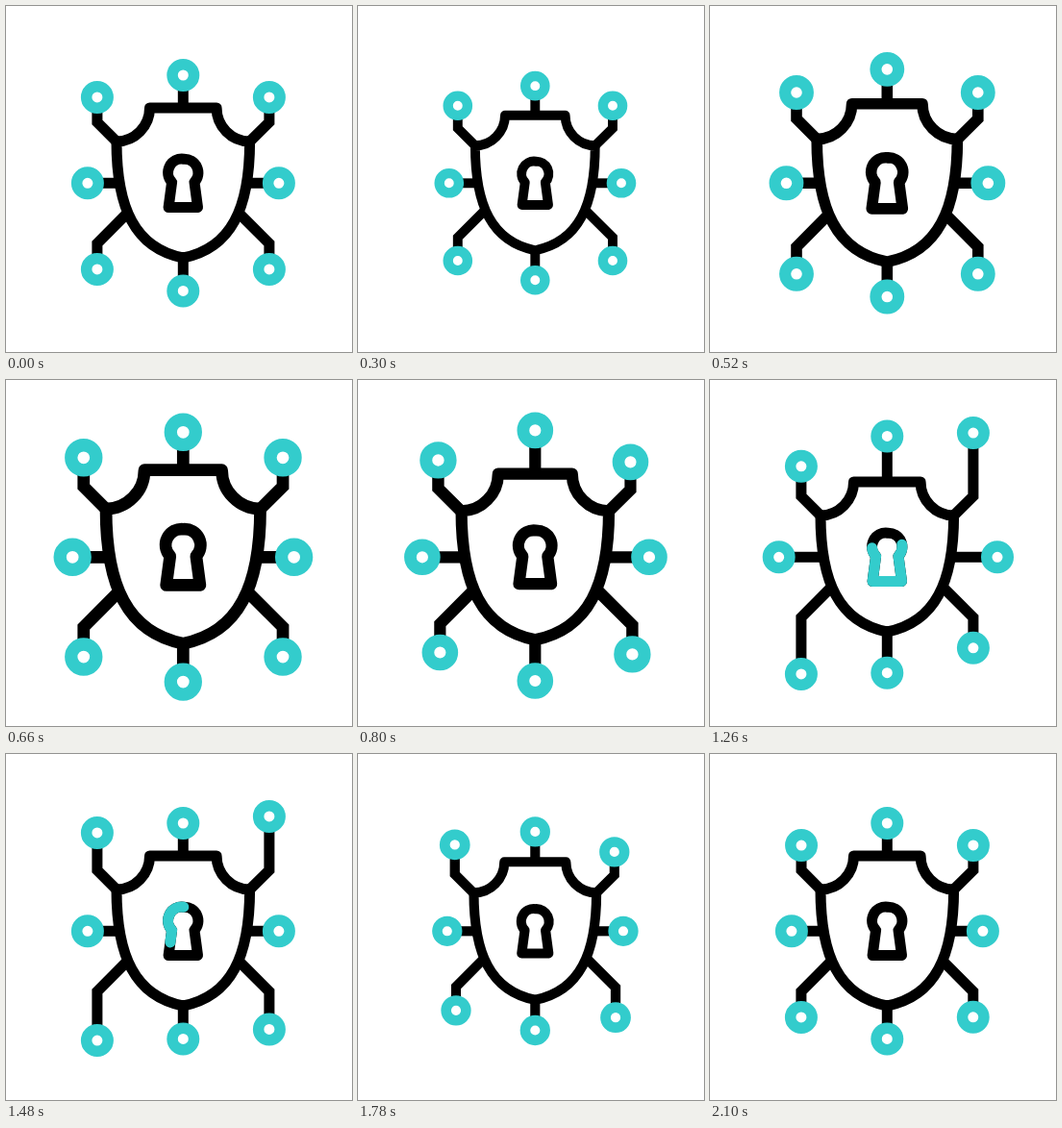
Recreate the animation shown at these times as an HTML page. Size 360 by 360 pixels, loop 2400 ms.

```html
<!DOCTYPE html>
<html lang="en">
<head>
<meta charset="utf-8">
<title>Shield network</title>
<style>
  html, body { margin: 0; width: 100%; height: 100%; overflow: hidden; background: #fff; }
  svg { display: block; width: 100vw; height: 100vh; }
  path { fill: none; stroke: #000; stroke-width: 11; }
  circle { fill: #fff; stroke: #3cc; stroke-width: 11.5; }
  .round { stroke-linejoin: round; stroke-linecap: round; }
  #trace { stroke: #3cc; }
</style>
</head>
<body>
<svg viewBox="0 0 360 360">
  <g id="arms"></g>
  <g id="shield">
    <path class="round" d="M-34.8 -78.3H34.8A35 35 0 0 0 69.3 -43.3C69.3 25.7 50.3 67.7 0 77.7C-50.3 67.7 -69.3 25.7 -69.3 -43.3A35 35 0 0 0 -34.8 -78.3Z"/>
    <path class="round hole"/>
    <path class="round hole" id="trace" pathLength="100"/>
  </g>
</svg>
<script>
const LOOP = 2400, MID = 184.3, PEAK = 690;
const NS = 'http://www.w3.org/2000/svg';
const $ = id => document.getElementById(id);

const clamp = x => Math.min(1, Math.max(0, x));
const ramp = (t, a, b) => clamp((t - a) / (b - a));
const ease = (t, a, b) => (1 - Math.cos(Math.PI * ramp(t, a, b))) / 2;
const bump = (t, a, b) => (1 - Math.cos(2 * Math.PI * ramp(t, a, b))) / 2;

// Dip, swell, settle, then a closing dip.
const zoom = t => 1
  - 0.1 * ease(t, 100, 310)
  + 0.28 * ramp(t, 310, PEAK)
  - 0.18 * ease(t, PEAK, 940)
  - 0.1 * ease(t, 1640, 1840)
  + 0.1 * ease(t, 1840, 2100);

const straight = t => bump(t, 706, 1149) + bump(t, 1149, 1480);
const early = t => bump(t, 830, 1795);
const late = t => bump(t, 1057, 2023);

// root: path from the shield; end: ring centre; dir: direction of travel
const arms = [
  { root: 'M0 -78', end: [0, -112.3], dir: [0, -1], reach: 18, grow: straight },
  { root: 'M0 78', end: [0, 112.1], dir: [0, 1], reach: 11, grow: straight },
  { root: 'M-66 0', end: [-99.4, 0], dir: [-1, 0], reach: 17.5, grow: straight },
  { root: 'M66 0', end: [99.6, 0], dir: [1, 0], reach: 20, grow: straight },
  { root: 'M-69.3 -43.3L-89.4 -63.4', end: [-89.4, -89.4], dir: [0, -1], reach: 13.5, grow: late, lag: 20 },
  { root: 'M58 31.2L89.6 62.8', end: [89.6, 89.6], dir: [0, 1], reach: 13, grow: late, lag: 20 },
  { root: 'M69.3 -43.3L89.6 -63.4', end: [89.6, -89.4], dir: [0, -1], reach: 41, grow: early },
  { root: 'M-58 31.2L-89.4 62.8', end: [-89.4, 89.6], dir: [0, 1], reach: 33, grow: early },
];

const add = (parent, tag) => parent.appendChild(document.createElementNS(NS, tag));

for (const arm of arms) {
  arm.group = add($('arms'), 'g');
  arm.stem = add(arm.group, 'path');
  arm.ring = add(arm.group, 'circle');
  arm.ring.setAttribute('r', 11.25);
}

const hole = 'M.5 -25.1A14.3 14.3 0 0 1 11.7 -1L15.2 25.2H-15.2L-11.7 -1A14.3 14.3 0 0 1 .5 -25.1';
document.querySelectorAll('.hole').forEach(p => p.setAttribute('d', hole));

const place = (el, s) => el.setAttribute('transform', `translate(${MID} ${MID}) scale(${s})`);

function draw(t) {
  place($('shield'), zoom(t));

  for (const { root, end, dir, reach, grow, lag = 0, group, stem, ring } of arms) {
    place(group, zoom(t < PEAK ? t : Math.max(PEAK, t - lag)));
    const [x, y] = end.map((v, i) => v + dir[i] * reach * grow(t));
    stem.setAttribute('d', `${root}L${x} ${y}`);
    ring.setAttribute('cx', x);
    ring.setAttribute('cy', y);
  }

  const head = 100 * ease(t, 880, 1400);
  const tail = 100 * ease(t, 1120, 1700);
  const trace = $('trace');
  trace.style.visibility = head - tail > 0.1 ? 'visible' : 'hidden';
  trace.setAttribute('stroke-dasharray', `0 ${tail} ${head - tail} 200`);
  // Skip the zero-length first dash so its round cap is not painted.
  trace.setAttribute('stroke-dasharray', `${head - tail} 200`);
  trace.setAttribute('stroke-dashoffset', -tail);
}

let start;
function tick(now) {
  start ??= now;
  draw((now - start) % LOOP);
  requestAnimationFrame(tick);
}
draw(0);
requestAnimationFrame(tick);
</script>
</body>
</html>
```
